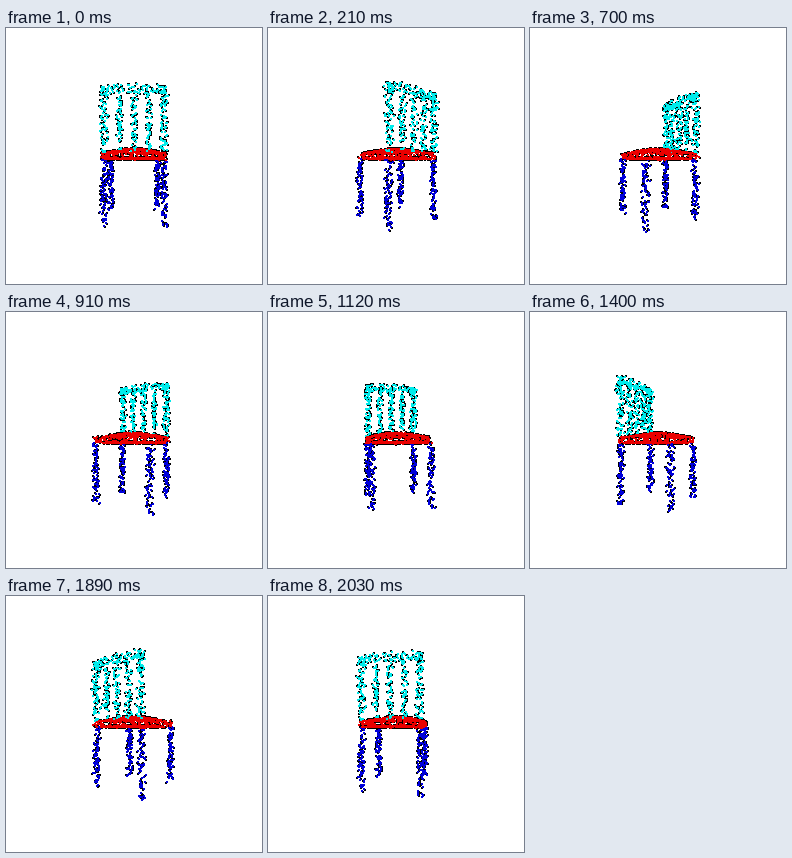
Write a matplotlib script that moves like this. It is 256 by 256 pixels and loops after 2.1 s.

```python
import numpy as np
import matplotlib.pyplot as plt
from matplotlib.animation import FuncAnimation

SIZE, DPI = 256, 64
FRAMES, INTERVAL = 30, 70
DIST = 200  # camera distance, in model units
CYAN, RED, BLUE = (0, 0.92, 0.92), (0.92, 0, 0), (0, 0, 0.86)

rng = np.random.default_rng(7)


def box(n, x, y, z):
    """Random points inside a box given by three (low, high) ranges."""
    return np.column_stack([rng.uniform(*r, n) for r in (x, y, z)])


def post(n, x, z, half, y, depth):
    return box(n, (x - half, x + half), y, (z - depth, z + depth))


def make_back():
    parts = [post(70, x, 26.5, 3.2, (3, 60), 3) for x in (-26, 26)]
    parts += [post(52, x, 26.5, 2.3, (3, 57), 3) for x in (-12.7, 0, 13)]
    rail = box(75, (-28.5, 28.5), (54.5, 62), (23.5, 29.5))
    rail[:, 1] -= 2.5 * (rail[:, 0] / 28.5) ** 4
    return np.vstack(parts + [rail])


def make_seat():
    w, d = 28, 28.5
    bottom = box(260, (-w, w), (-3.2, -2.2), (-d, d))
    top = box(260, (-w, w), (0, 0), (-d, d))
    u, v = top[:, 0] / w, top[:, 2] / d
    top[:, 1] = 2.5 + 4.6 * (1 - u ** 2) * (1 - v ** 2)
    rim = box(90, (-w, w), (-2.5, 2.5), (-d, d))
    side = np.arange(90) % 4
    rim[side == 0, 0], rim[side == 1, 0] = -w, w
    rim[side == 2, 2], rim[side == 3, 2] = -d, d
    return np.vstack([bottom, top, rim])


def make_legs():
    feet = [(-26.3, 25.6), (26.3, 25.6), (-26.5, -27), (26.5, -27)]
    return np.vstack([post(68, x, z, 2.7, (-61, -3), 2.7) for x, z in feet])


groups = [(make_back(), CYAN), (make_seat(), RED), (make_legs(), BLUE)]
points = np.vstack([p for p, _ in groups])
colors = np.vstack([np.tile(c, (len(p), 1)) for p, c in groups])
shadow = rng.choice([-1, 1], (len(points), 2))

fig = plt.figure(figsize=(SIZE / DPI, SIZE / DPI), dpi=DPI, facecolor="white")
ax = fig.add_axes([0, 0, 1, 1])
ax.set(xlim=(0, SIZE), ylim=(SIZE, 0))
ax.axis("off")

dot = dict(s=(2 * 72 / DPI) ** 2, marker="s", linewidths=0, antialiased=False)
start = np.zeros(len(points))
dark = ax.scatter(start, start, color="black", zorder=1, **dot)
lit = ax.scatter(start, start, c=colors, zorder=2, **dot)


def project(angle):
    x, y, z = points.T
    c, s = np.cos(angle), np.sin(angle)
    depth = z * c - x * s
    scale = DIST / (DIST - depth)
    flat = np.column_stack([x * c + z * s, -y]) * scale[:, None]
    return np.round(flat + SIZE / 2), depth


def update(i):
    xy, depth = project(2 * np.pi * i / FRAMES)
    order = np.argsort(depth)
    dark.set_offsets(xy + shadow)
    lit.set_offsets(xy[order])
    lit.set_facecolors(colors[order])
    return dark, lit


anim = FuncAnimation(fig, update, frames=FRAMES, interval=INTERVAL,
                     repeat=True, repeat_delay=0)
plt.show()
```
